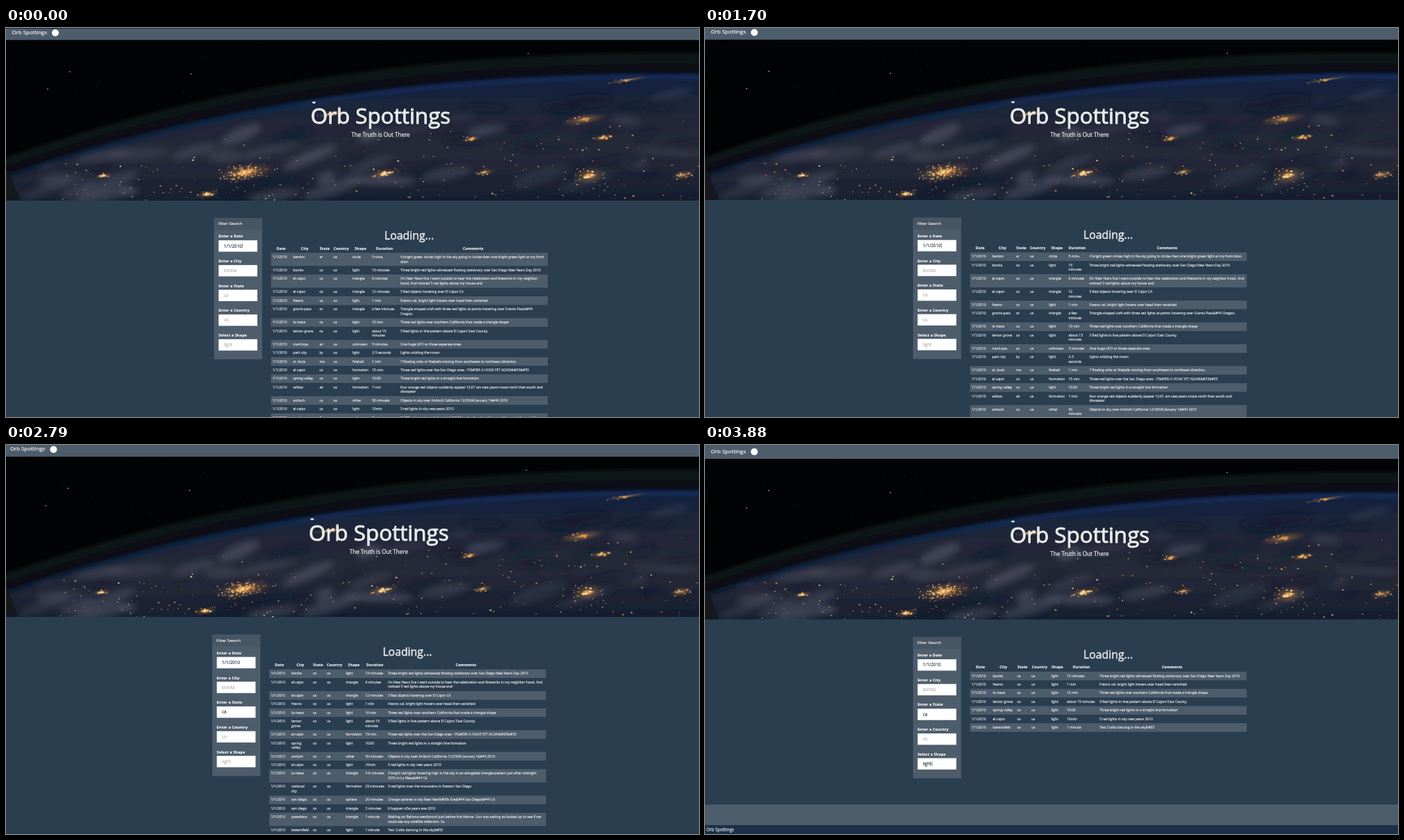
Recreate the animation shown at these times as an HTML page. Size 998x561 px, loop 4.32 s.

```html
<!DOCTYPE html>
<html lang="en">
<head>
<meta charset="utf-8">
<title>Orb Spottings</title>
<style>
html, body { margin: 0; width: 100%; height: 100%; overflow: hidden; background: #2b3e50; }
svg { display: block; width: 100vw; height: 100vh; }
text {
  font-family: "Open Sans", "Noto Sans", sans-serif; white-space: pre;
  color: #ebebeb; fill: currentColor; stroke: currentColor; stroke-width: .03em;
}
.bold { font-weight: 700; letter-spacing: .2px; color: #fff; }
.mid { text-anchor: middle; }
.typed { color: #2b3e50; }
.hint { color: #999; stroke: none; }
</style>
</head>
<body>
<svg viewBox="0 0 998 561">
  <defs>
    <filter id="soft" x="-50%" y="-50%" width="200%" height="200%"><feGaussianBlur stdDeviation="5"/></filter>
    <filter id="haze" x="-20%" y="-20%" width="140%" height="140%"><feGaussianBlur stdDeviation="3"/></filter>
    <linearGradient id="land" x1=".42" y1="0" x2=".5" y2="1">
      <stop offset="0" stop-color="#10213f"/>
      <stop offset=".3" stop-color="#1f2739"/>
      <stop offset=".6" stop-color="#272a39"/>
      <stop offset="1" stop-color="#141d2e"/>
    </linearGradient>
    <linearGradient id="limb">
      <stop offset="0" stop-color="#0a1830"/>
      <stop offset=".45" stop-color="#12346e"/>
      <stop offset="1" stop-color="#143a78"/>
    </linearGradient>
    <radialGradient id="glow">
      <stop offset="0" stop-color="#ffc66e" stop-opacity=".8"/>
      <stop offset=".35" stop-color="#d08a44" stop-opacity=".35"/>
      <stop offset="1" stop-color="#a86a3c" stop-opacity="0"/>
    </radialGradient>
    <clipPath id="frame"><rect x="-10" y="17.2" width="1018" height="231.3"/></clipPath>
    <clipPath id="globe"><path d="M-10 217C245 131 560 62 1010 69V260H-10Z"/></clipPath>
  </defs>
  <g id="page">
    <g id="photo" clip-path="url(#frame)"></g>
    <g id="ui"></g>
  </g>
  <g id="footer"></g>
</svg>
<script>
const $ = id => document.getElementById(id);
const NAME = 'Orb Spottings';
const STARTS = [0, 1050, 2140, 3230], LOOP = 4320;
const SLATE = '#4e5d6c', LINE = 6.65, ROW = 12.4;

// Per scene: page shift, column positions, typed fields and the field with the caret
const SCENES = [
  { dx: 0, dy: 0, cols: [384, 413.5, 451.5, 471.5, 499, 527, 568], typed: [0], caret: 0 },
  { dx: 0, dy: -.5, cols: [384, 413.5, 448, 468, 495.2, 523.5, 553.5], typed: [0], caret: 0 },
  { dx: -2.6, dy: -.5, cols: [384, 413.6, 444.5, 464.5, 492, 520, 552.5], typed: [0, 2] },
  { dx: 0, dy: 2.8, cols: [384, 414.5, 449.5, 470, 498.7, 521, 568], typed: [0, 2, 4], caret: 4 }
];
const HEADS = ['Date', 'City', 'State', 'Country', 'Shape', 'Duration', 'Comments'];
const FIELDS = [['Enter a Date', '1/1/2010'], ['Enter a City', 'bonita'], ['Enter a State', 'ca'],
  ['Enter a Country', 'us'], ['Select a Shape', 'light']];

// scenes|city|state|shape|duration|comment; [n] is a space that breaks the line in scenes n
const REPORTS = `01|benton|ar|circle|5 mins.|4 bright green circles high in the sky going in circles then one bright green light at my front[0]door.
0123|bonita|ca|light|13[1]minutes|Three bright red lights witnessed floating stationary over San Diego New Years Day 2010
012|el cajon|ca|triangle|6 minutes|On New Years Eve I went outside to hear the celebration and fireworks in my neighbor[0]hood. And[12]noticed 3 red lights above my house and
012|el cajon|ca|triangle|12[1]minutes|3 Red objects hovering over El Cajon CA
0123|fresno|ca|light|1 min|Fresno cal. bright light hovers over head then vanished
01|grants pass|or|triangle|a few[1]mintues|Triangle shaped craft with three red lights at points hovering over Grants Pass&#44[0]Oregon.
0123|la mesa|ca|light|10 min|Three red lights over southern California that made a triangle shape
0123|lemon[2]grove|ca|light|about 15[012]minutes|3 Red lights in line pattern above El Cajon/ East County.
01|maricopa|az|unknown|3 minutes|One huge UFO or three seperate ones
01|park city|ky|light|2-3[1]seconds|Lights orbiting the moon
01|st. louis|mo|fireball|1 min|7 floating orbs or fireballs moving from southwest to northeast direction.
012|el cajon|ca|formation|15 min.|Three red lights over the San Diego area - IT&#39S A HOAX YET AGAIN&#33&#33
0123|spring[2]valley|ca|light|10:00|Three bright red lights in a straight line formation
01|willow|ak|formation|7 min|four orange red objects suddenly appear 12:01 am new years move north then south and[01]dissapear
012|antioch|ca|other|30[1]minuets|Objects in sky over Antioch California 12:03AM January 1&#44 2010
023|el cajon|ca|light|10min|3 red lights in sky new years 2010
0|naples|fl|sphere|3 min|I&#39m in senior park, last night&#44 my husband and I were sitting outside - neighbors[0]saw it
2|la mesa|ca|triangle|4-6 minutes|3 bright red lights hovering high in the sky in an elongated triangle pattern just after midnight[2]2010 in La Mesa&#44 Ca
2|national[2]city|ca|formation|25 mintutes|3 red lights over the mountains in Eastern San Diego
2|san diego|ca|sphere|20 minutes|Orange spheres in sky New Year&#39s Eve&#44 San Diego&#44 CA
2|san diego|ca|triangle|3 minutes|It happen nEw years eve 2010
2|pasadena|ca|triangle|1 minute|Walking on Belrona westbound just before the Velmar. Sun was setting so looked up to see if we[2]could see any satellite reflection. Sa
23|bakersfield|ca|light|1 minute|Two Crafts dancing in the sky&#33`.split('\n').map(r => r.split('|'));

const rect = (x, y, w, h, fill) => `<rect x="${x}" y="${y}" width="${w}" height="${h}" fill="${fill}"/>`;
const text = (x, y, size, str, cls = '') =>
  `<text x="${x}" y="${y}" font-size="${size}" class="${cls}">${str.replace(/&/g, '&amp;')}</text>`;
const oval = (x, y, rx, ry, fill, extra = '') =>
  `<ellipse cx="${x}" cy="${y}" rx="${rx}" ry="${ry}" fill="${fill}" ${extra}/>`;

function drawPhoto() {
  let seed = 11;
  const rnd = () => (seed = seed * 16807 % 2147483647) / 2147483647;
  const spread = () => rnd() + rnd() + rnd() - 1.5;
  const light = (x, y, r) => oval(x, y, r * 1.5, r, rnd() < .35 ? '#ffdf9c' : '#d8954e', `opacity="${.4 + rnd() * .55}"`);
  // A glow with short streets of light running outwards
  const city = (x, y, rx, ry, n) => {
    let s = `<g transform="translate(${x} ${y}) rotate(-9)">` + oval(0, 0, rx, ry, 'url(#glow)');
    while (n--) {
      const a = Math.floor(rnd() * 9) * .7, d = rnd() ** 1.5;
      s += light(Math.cos(a) * d * rx + spread() * rx * .2, Math.sin(a) * d * ry + spread() * ry * .2, .5 + (1 - d) * 1.2);
    }
    return s + '</g>';
  };
  let s = rect(-10, 0, 1020, 260, '#020304');
  for (let i = 0; i < 40; i++) s += oval(rnd() * 600, 20 + rnd() * 90, .4, .4, '#8a97a8', 'opacity=".5"');
  for (const [x, y] of [[267, 66], [92, 63], [752, 37], [60, 88]]) s += oval(x, y, .8, .8, '#cfd8e4');
  // Airglow, atmosphere and night side
  s += '<g filter="url(#haze)"><path d="M-10 190C260 95 560 30 1010 36V260H-10Z" fill="#0f1613"/>'
    + '<path d="M-10 202C250 110 560 45 1010 52V260H-10Z" fill="#070c13"/>'
    + '<path d="M-10 217C245 131 560 62 1010 69V260H-10Z" fill="url(#land)"/></g>'
    + '<g clip-path="url(#globe)"><g filter="url(#soft)">';
  for (let i = 0; i < 60; i++) {
    const x = 40 + rnd() * 950, top = 222 - 132 * Math.sqrt(x / 998), y = top + rnd() * (245 - top);
    s += oval(x, y, 14 + rnd() * 38, 3 + rnd() * 7,
      i % 2 ? '#565a6c' : '#101a2c', `opacity="${.25 + rnd() * .4}" transform="rotate(${-25 + rnd() * 30} ${x} ${y})"`);
  }
  s += '</g></g><path d="M-10 218C245 132 560 63 1010 70" fill="none" stroke="url(#limb)" stroke-width="4" filter="url(#haze)"/>'
    + '<g clip-path="url(#globe)">';
  for (let i = 0; i < 260; i++) {
    const x = 60 + rnd() * 940, top = 226 - 120 * Math.sqrt(x / 998);
    s += light(x, top + Math.sqrt(rnd()) * (250 - top), .3 + rnd() * .8);
  }
  for (const c of [[345, 208, 42, 13, 120], [545, 210, 22, 7, 24], [840, 213, 24, 13, 34], [832, 132, 34, 8, 12],
    [860, 158, 18, 5, 12], [670, 160, 16, 5, 8], [895, 75, 34, 3, 8], [470, 124, 24, 4, 8],
    [140, 213, 14, 4, 6], [290, 240, 18, 6, 14], [975, 212, 18, 7, 10], [690, 208, 14, 5, 8]]) s += city(...c);
  s += '</g>' + oval(443.5, 107.5, 2.6, 1.4, '#d5e2f0')
    + '<path d="M-10 196L4 207L21 250H-10Z" fill="#15181d"/>';
  $('photo').innerHTML = s;
}

function drawPanel({ typed, caret }) {
  let s = rect(299.7, 274, 69.2, 203.8, SLATE) + rect(299.7, 274, 69.2, 17, '#485563')
    + text(305.7, 284.2, 6.05, 'Filter Search');
  FIELDS.forEach(([label, value], i) => {
    const y = 306.2 + i * 35.65, on = typed.includes(i);
    s += text(306.2, y - 3.8, 5.3, label, 'bold') + rect(306.2, y, 55.8, 16.4, '#fff')
      + text(313.7, y + 10.3, 6.2, value, on ? 'typed' : 'hint');
    if (i === caret) s += rect(i ? 326.8 : 340, y + 4.2, .5, 7.6, '#222');
  });
  return s;
}

function drawTable(k, cols) {
  let y = 324.1, odd = true;
  let s = HEADS.map((h, i) =>
    text((cols[i] + (cols[i + 1] || 782.5) - 4.8) / 2, 319.7, 5.2, h, 'bold mid')).join('');
  for (const [scenes, city, state, shape, time, note] of REPORTS) {
    if (!scenes.includes(k)) continue;
    const cells = ['1/1/2010', city, state, 'us', shape, time, note].map(c =>
      c.replace(/\[(\d+)\]/g, (m, d) => d.includes(k) ? '\n' : ' ').split('\n'));
    const h = ROW + (Math.max(...cells.map(c => c.length)) - 1) * LINE;
    if (odd) s += rect(381.6, y, 398.6, h, SLATE);
    cells.forEach((lines, i) => lines.forEach((line, j) => {
      s += text(cols[i], y + 7.8 + j * LINE, 4.95, line);
    }));
    y += h;
    odd = !odd;
  }
  return s;
}

function draw(k) {
  const scene = SCENES[k];
  $('page').setAttribute('transform', `translate(${scene.dx} ${scene.dy})`);
  $('ui').innerHTML = rect(-10, -10, 1020, 27.2, SLATE)
    + (k ? '' : rect(-10, 0, 1020, .9, '#1b2530'))
    + text(8.5, 8.9, 7.85, NAME) + oval(71, 7, 5, 5, '#fff')
    + text(539.5, 138, 31.4, NAME, 'mid')
    + text(539.5, 157.1, 8.1, 'The Truth is Out There', 'mid')
    + text(580.6, 304.9, 15.8, 'Loading...', 'mid')
    + drawPanel(scene) + drawTable(k, scene.cols);
  $('footer').innerHTML = k < 3 ? ''
    : rect(0, 518.6, 998, 29.8, SLATE) + rect(0, 548.4, 998, 13, '#1b3048') + text(2, 556.5, 6.2, NAME);
}

let shown = -1;
function tick() {
  const t = performance.now() % LOOP;
  const k = STARTS.filter(s => s <= t).length - 1;
  if (k !== shown) draw(shown = k);
  requestAnimationFrame(tick);
}
drawPhoto();
tick();
</script>
</body>
</html>
```
